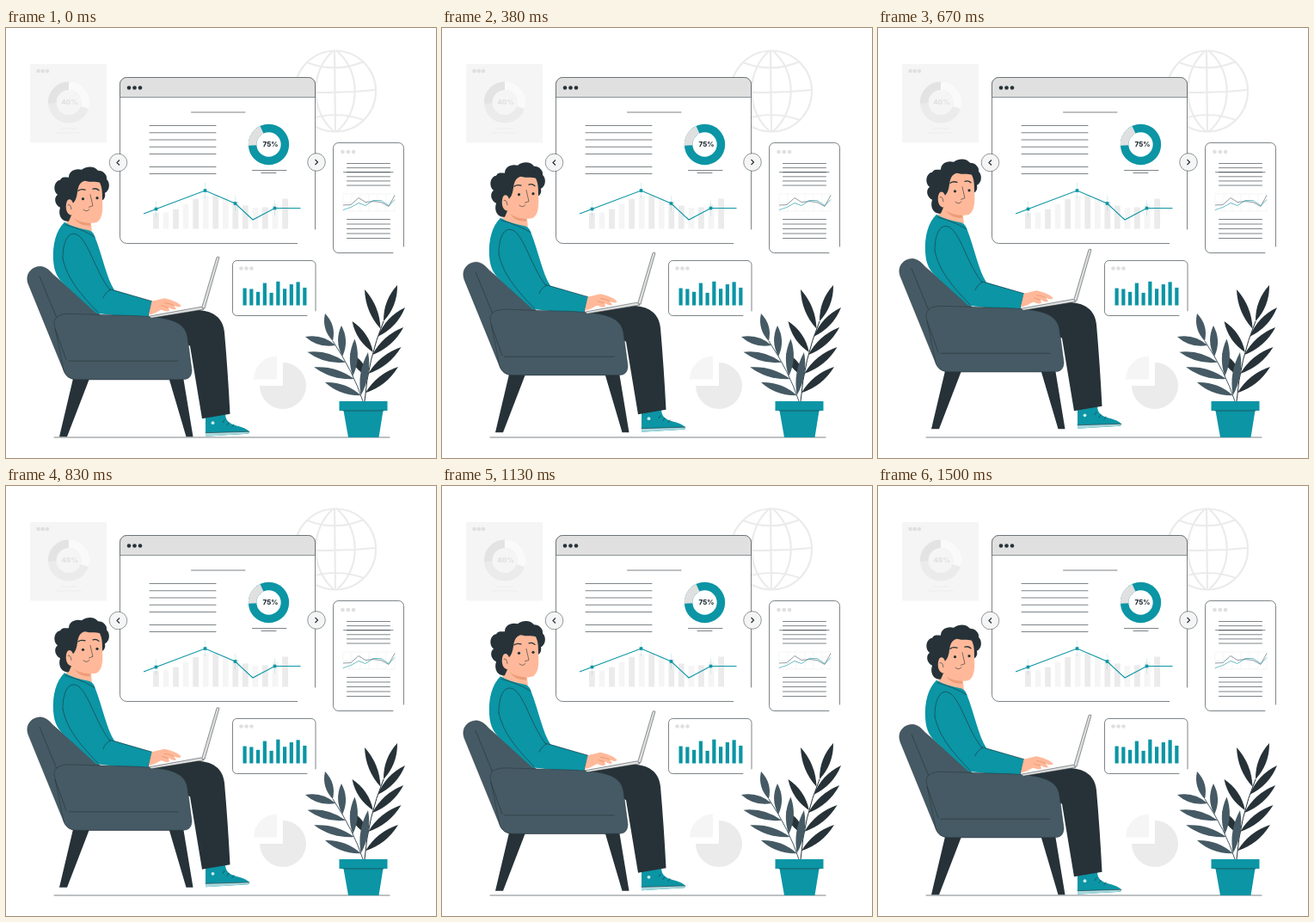
Animation of 500x500 px, one loop 1.54 s. Source, as an HTML page:

```html
<!DOCTYPE html>
<html lang="en">
<head>
<meta charset="utf-8">
<title>Data report</title>
<style>
  html, body { margin: 0; width: 100%; height: 100%; overflow: hidden; background: #fff; }
  svg { display: block; width: 100%; height: 100%; }
  text { font: 800 8px Inter, sans-serif; text-anchor: middle; }
  .teal { fill: #0b95a5; }
  .dark { fill: #263238; }
  .slate { fill: #455a64; }
  .skin { fill: #ffb99a; }
  .line { fill: none; stroke: #263238; stroke-width: .6; stroke-linecap: round; stroke-linejoin: round; }
  .edge { stroke: #263238; stroke-width: .5; stroke-linejoin: round; }
  .card { fill: #fff; stroke: #263238; stroke-width: .6; stroke-dasharray: 47.5 4 48.5; }
  .ring { fill: none; stroke-width: 9.5; }
</style>
</head>
<body>
<svg viewBox="0 0 500 500">
  <!-- faint background -->
  <rect x="28" y="42" width="89" height="91.5" rx="1.5" fill="#f5f5f5"/>
  <g class="ring">
    <circle cx="73" cy="86.5" r="19.3" stroke="#ebebeb"/>
    <path d="M53.7 87.5A19.3 19.3 0 0 1 73 67.2" stroke="#e3e3e3"/>
    <path d="M73 67.2A19.3 19.3 0 0 1 91.5 92.5" stroke="#fafafa"/>
  </g>
  <text x="74" y="89.3" fill="#e0e0e0">40%</text>
  <path d="M64 117h19M57 122h31" stroke="#ebebeb" stroke-width=".8"/>
  <g fill="none" stroke="#ebebeb" stroke-width="2.2">
    <circle cx="383" cy="73.5" r="47"/>
    <path d="M382 26L383 121M381 26C353 50 353 97 382 121M384 26C413 50 413 97 384 121M336 74Q383 77 430 72M350 40Q383 53 416 39M350 107Q383 95 416 107"/>
  </g>
  <path d="M322 416V389A27 27 0 1 1 295 416Z" fill="#ebebeb"/>
  <path d="M315 408.5H288A27 27 0 0 1 315 381.5Z" fill="#f5f5f5"/>

  <!-- main window -->
  <rect class="card" pathLength="100" x="132.5" y="57.5" width="227" height="193" rx="8"/>
  <path class="edge" d="M132.5 80.5V65.5a8 8 0 0 1 8-8h211a8 8 0 0 1 8 8v15Z" fill="#e0e0e0"/>
  <path class="line" d="M215.5 98H278M286.5 165.5h39.5M297 168.5h17"/>
  <g class="ring">
    <circle cx="305.5" cy="135.5" r="18.9" stroke="#0b95a5"/>
    <path d="M286.6 136.5A18.9 18.9 0 0 1 297.5 118.4" stroke="#e0e0e0"/>
  </g>
  <text class="dark" x="307.5" y="138.2">75%</text>
  <g id="columns"></g>
  <path id="trend" fill="none" stroke="#0b95a5" stroke-width="1.1" d="M160 216L174.5 210.5L231.5 189L266.5 204L287 223L312.5 209.5H342.5"/>
  <g id="nodes"></g>
  <g class="edge" fill="#f5f5f5">
    <circle cx="130.5" cy="156.5" r="10.3"/>
    <circle cx="361" cy="156" r="10.3"/>
  </g>
  <path d="M132 153.5l-3 3 3 3M359.5 153l3 3-3 3" fill="none" stroke="#263238" stroke-width="1.2"/>

  <!-- side cards -->
  <rect class="card" pathLength="100" x="380.5" y="133.5" width="82" height="128" rx="6"/>
  <g id="grid" stroke="#f0f0f0" stroke-width=".6"></g>
  <g fill="none" stroke-width=".6">
    <path d="M392 206l9-.5 9-8 8 5 9-1 9 1 9 5 7-13" stroke="#455a64"/>
    <path d="M392 211.5l9-3 9-5 8 3 9-6h9l9 6 7-7" stroke="#0b95a5"/>
  </g>
  <rect class="card" pathLength="100" x="263.5" y="270.5" width="96.5" height="64" rx="5"/>
  <g id="dots"></g>
  <g id="rules" class="line"></g>
  <g id="bars"></g>

  <!-- plant -->
  <path class="line" d="M56 476H446"/>
  <g id="plant"></g>
  <path class="teal" d="M392.5 445H438.5L433.5 476H398Z"/>
  <rect class="teal" x="387.5" y="434" width="56" height="11"/>
  <path class="line" d="M392 445H439"/>

  <!-- man, chair and laptop -->
  <g id="sitter">
    <path class="dark" d="M78 408H97L71 475.5H62ZM189 406H206L217.5 475.5H209.5Z"/>
    <path class="teal" d="M232 452L255 448C255 454 257 458 263 461C271 464 280 465 283 470L282 472L232 475Z"/>
    <path d="M232 471L283 469.5Q283 472 279 472L232 475Z" fill="#a8d9de"/>
    <path class="line" d="M232 471L283 469.5M252 459l2-3M257 462l2-3M263 464l2-3"/>
    <circle cx="240.5" cy="459.5" r="1.9" fill="#c9eaed"/>
    <path class="dark" d="M158 338L205 329C236 325 252 334 254 354Q258 400 260.5 449L228 454.5L214 370Z"/>
    <path class="slate edge" d="M26 298C22 287 29 278 40 277.5C47 278 51 283 56 288L112 336L200 350V409H83C74 409 69 405 66 396Z"/>
    <path class="line" d="M39 289L60 340"/>

    <!-- neck and jacket -->
    <path class="skin" d="M73 212L70 228Q82 239 100 238L98 218Z"/>
    <path d="M79 221Q87 228 98 226V230Q85 231 79 221Z" fill="#ed9c78"/>
    <path class="teal" d="M68 226C58 236 54 252 55 270C56 285 60 292 72 302L105 332C130 335 150 337 165 337L170 318L126 305C117 291 113 268 103 242Q101 236 94 235Q78 232 68 226Z"/>
    <path class="line" d="M69 229Q88 234 103 243M66 268C66 243 76 234 86 243C98 255 105 285 121 305M66 268C71 292 86 309 107 331M121 305Q115 308 113 314M121 304L170 318L165 337"/>

    <!-- head -->
    <path class="dark" d="M73 225C65 226 60 218 63 209C57 206 55 198 60 194C54 189 56 178 63 177C65 173 69 174 73 174C73 167 80 163 88 165C95 160 103 161 107 166C113 166 118 171 117 176C122 181 120 190 115 192C116 197 114 200 111 201L76 218Z"/>
    <path class="skin" d="M83 191C84 184 86 179 92 178C98 180 104 178 109 180C112 186 112 192 112 200C113 212 112 222 106 226C98 229 84 226 77 218C71 218 69 211 70 205C71 198 76 198 78 204Q82 200 83 191Z"/>
    <path class="line" d="M72 206Q75 204 76 211M98 194L101 207L96.5 208.5M90 211.5Q94 215 97 211"/>
    <path d="M84 189.5Q87 187 92 188.5M101 187.5Q105 186 108 189" fill="none" stroke="#263238" stroke-width="1.3" stroke-linecap="round"/>
    <g class="dark">
      <circle cx="89.5" cy="199" r="1.6"/>
      <circle cx="106" cy="198" r="1.6"/>
    </g>

    <!-- arm of the chair -->
    <path class="slate edge" d="M56 344C56 336 62 333 73 332.5L155 335C184 337 208 339 211 360L216 398C216 406 212 409 205 409H83C74 409 69 405 67 398Z"/>
    <path class="line" d="M57 350L70 386M73 387.5H200"/>

    <!-- laptop and hand -->
    <g class="edge" fill="#e0e0e0">
      <path d="M227.5 326L245 267Q246.500 265.5 248 267L231 326.5Z"/>
      <path d="M166 335.5L227 324.5L230 327.5L169 337.5Z"/>
    </g>
    <path class="skin" d="M169.5 318L184 314.5C191 316 198 318 203 322.5C204 325.5 200 325 195 323L198 327Q195 329 189 325L190 329Q187 331 181 328C176 329 174 333 166 333.5Z"/>
    <path d="M184 320Q190 320 195 323M181 323L189 325.5" fill="none" stroke="#e58e68" stroke-width=".7"/>
  </g>
</svg>
<script>
const LOOP = 1540, FLOAT = 1500, LIFT = 10, LEAD = 20;
const el = id => document.getElementById(id);
const repeat = (n, make) => Array.from({ length: n }, (_, i) => make(i)).join('');
const lerp = (a, b, t) => a + (b - a) * t;

const dots = (x, y, step, color) =>
  repeat(3, i => `<circle cx="${x + i * step}" cy="${y}" r="2.3" fill="${color}"/>`);
el('dots').innerHTML = dots(37.5, 50, 5.2, '#e0e0e0') + dots(143, 69.5, 6.5, '#263238') +
  dots(391.5, 144, 6.3, '#e0e0e0') + dots(273.5, 279.5, 6, '#e0e0e0');

const rules = (x, y, width, n, step) => repeat(n, i => `<path d="M${x} ${y + i * step}h${width}"/>`);
el('rules').innerHTML = rules(167, 113.5, 77, 5, 8.25) + rules(167, 161.5, 77, 2, 8) +
  rules(396.5, 157.5, 50, 6, 5.1) + rules(396.5, 222.5, 50, 5, 5.5) + rules(392.5, 167.7, 57.5, 1, 0);
el('grid').innerHTML = rules(392, 193, 60, 3, 10) + repeat(7, i => `<path d="M${392 + i * 10} 193v20"/>`);

const bars = (n, x, base, step, width, height, color) => repeat(n, i =>
  `<rect x="${x + i * step}" y="${base - height(i)}" width="${width}" height="${height(i)}" fill="${color(i)}"/>`);
el('columns').innerHTML = bars(14, 171, 233.5, 11.55, 6.8,
  i => 27 + .6 * i - 9 * Math.cos(.63 * (i - .5)),
  i => (i < 9) === (i % 2 === 0) ? '#ebebeb' : '#f5f5f5');
el('bars').innerHTML = bars(10, 275.5, 322.5, 7.75, 4.2,
  i => 17.5 + .9 * i - 6.5 * Math.cos(Math.PI * i) * Math.cos(.49 * (i - 4)),
  () => '#0b95a5');

// Markers sit on four corners of the trend line.
const corners = el('trend').getAttribute('d').match(/[\d.]+ [\d.]+/g).map(p => p.split(' ').map(Number));
el('nodes').innerHTML = [1, 2, 3, 5].map(i => corners[i]).map(([x, y]) =>
  `<path d="M${x} ${y - 9}v18" stroke="#0b95a5" stroke-width=".4" opacity=".4"/>
   <rect class="teal" x="${x - 1.8}" y="${y - 1.8}" width="3.6" height="3.6"/>`).join('');

function leaf([x, y], [tipX, tipY]) {
  const dx = tipX - x, dy = tipY - y, k = 9 / Math.hypot(dx, dy);
  const mx = x + dx / 2, my = y + dy / 2;
  return `<path d="M${x} ${y}Q${mx - dy * k} ${my + dx * k} ${tipX} ${tipY}Q${mx + dy * k} ${my - dx * k} ${x} ${y}"/>`;
}

// Leaves run down both sides of a curved stem; each side is given by its first and last tip.
function frond(color, root, bend, end, tip, sides) {
  const at = t => [0, 1].map(k => lerp(lerp(root[k], bend[k], t), lerp(bend[k], end[k], t), t));
  const row = ({ n, first, last, from, to, bow }) => repeat(n, i => {
    const t = i / (n - 1);
    return leaf(at(lerp(from, to, t)),
      [lerp(first[0], last[0], t) + bow * Math.sin(Math.PI * t), lerp(first[1], last[1], t)]);
  });
  return `<g fill="${color}"><path d="M${root}Q${bend} ${end}" fill="none" stroke="${color}"/>
    ${leaf(end, tip)}${sides.map(row).join('')}</g>`;
}
el('plant').innerHTML =
  frond('#263238', [417, 434], [421, 385], [439, 341], [455, 299], [
    { n: 3, first: [417, 304], last: [400, 378], from: .9, to: .3, bow: -6 },
    { n: 4, first: [464, 325], last: [456, 394], from: .8, to: .1, bow: 1 }
  ]) +
  frond('#455a64', [415, 434], [404, 400], [380, 364], [371, 332], [
    { n: 4, first: [348, 359], last: [371, 412], from: .93, to: .1, bow: -6 },
    { n: 3, first: [390, 346], last: [421, 377], from: .75, to: .1, bow: 0 }
  ]);

// Steady rise and fall.
function draw(now) {
  const phase = (now % LOOP + LEAD) / FLOAT % 1;
  const lift = LIFT * (1 - Math.abs(2 * phase - 1));
  el('sitter').setAttribute('transform', `translate(0 ${-lift})`);
  requestAnimationFrame(draw);
}
draw(performance.now());
</script>
</body>
</html>
```
